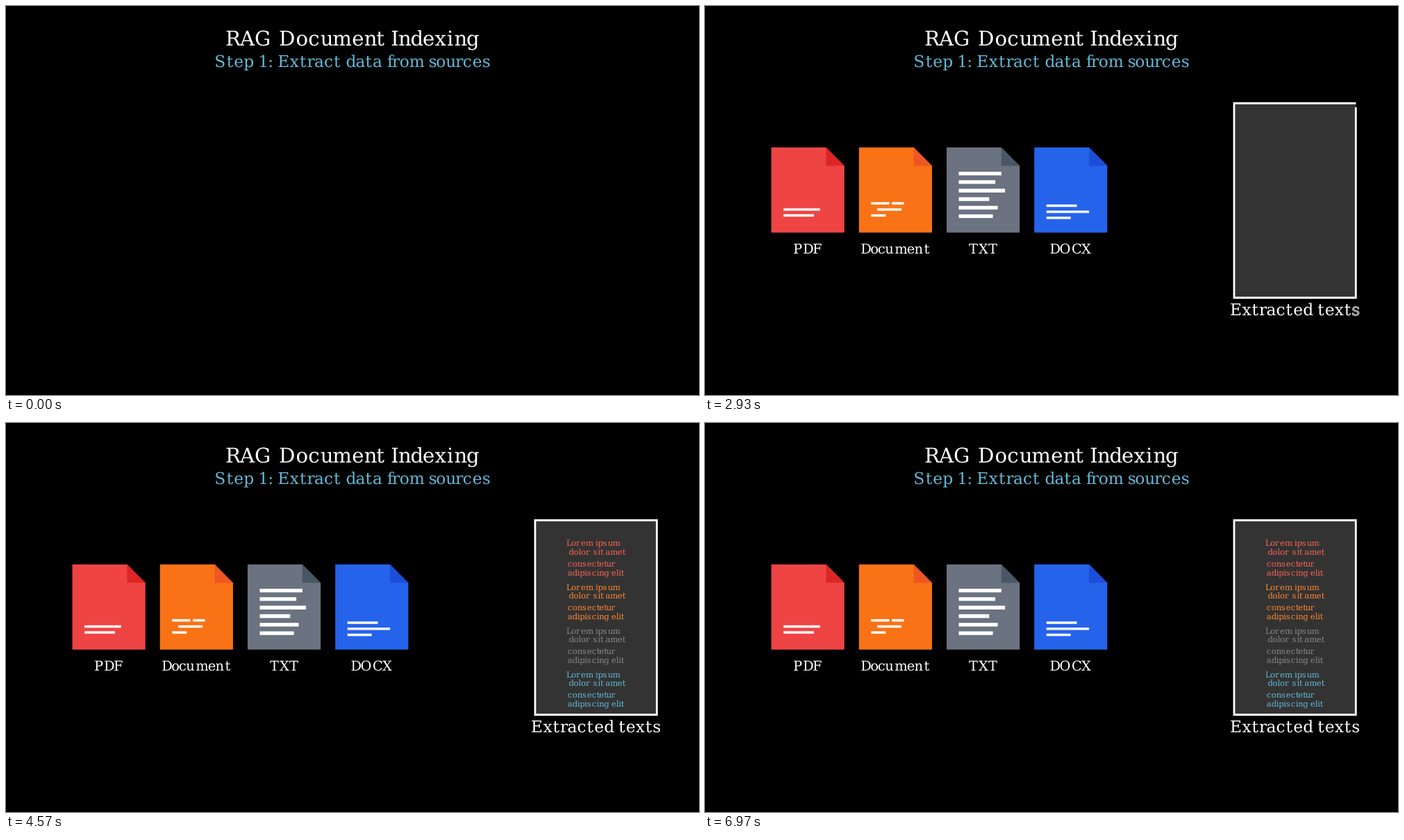
An HTML page with a canvas for the animation above (7.01 s loop, 998 by 561 pixels).

```html
<!DOCTYPE html>
<html lang="en">
<head>
<meta charset="utf-8">
<title>RAG Document Indexing</title>
<style>
html, body { margin: 0; width: 100%; height: 100%; overflow: hidden; background: #000; }
canvas { display: block; }
</style>
</head>
<body>
<canvas id="stage" width="998" height="561"></canvas>
<script>
const ctx = document.getElementById('stage').getContext('2d');
const LOOP = 7010, FPS = 30;
const U = 561 / 8;                       // pixels per scene unit
const GRID = U / 20;                     // letter advances snap to this
const PAGE_W = 1.5 * U, PAGE_H = 1.75 * U, FOLD = PAGE_W / 4;
const PAGE_X = 95.5, PAGE_Y = 204.1, STEP = 1.8 * U;
const MID = 499, BOX_X = MID + 5 * U;
const BLUE = '#62b9d6';

const clamp = v => Math.max(0, Math.min(1, v));
const lerp = (a, b, p) => a + (b - a) * p;

function smooth(t) {
  const sig = x => 1 / (1 + Math.exp(-x));
  const e = sig(-5);
  return clamp((sig(10 * (clamp(t) - 0.5)) - e) / (1 - 2 * e));
}

// Sets the font for a point size and returns its size in pixels.
function setFont(size) {
  const em = size / 3.6 * GRID;
  ctx.font = em + 'px "DejaVu Serif", serif';
  ctx.textRendering = 'geometricPrecision';
  return em;
}

// Lays out a string from pen position 0.
function layout(str, size) {
  setFont(size);
  let x = 0;
  return [...str].map(ch => {
    const letter = { ch, x };
    x += Math.round(ctx.measureText(ch).width / GRID) * GRID;
    return letter;
  });
}

// Lays out a string with its ink centred on cx.
function centred(str, size, cx) {
  const row = layout(str, size), last = row[row.length - 1];
  const left = -ctx.measureText(row[0].ch).actualBoundingBoxLeft;
  const right = last.x + ctx.measureText(last.ch).actualBoundingBoxRight;
  const shift = cx - (left + right) / 2;
  return row.map(l => ({ ch: l.ch, x: l.x + shift })).filter(l => l.ch !== ' ');
}

function drawRow(row, x, y, size, color) {
  setFont(size);
  ctx.fillStyle = color;
  row.forEach(l => ctx.fillText(l.ch, x + l.x, y));
}

// Traces the first part p of a closed polygon's outline.
function trace(pts, p) {
  const n = pts.length;
  const len = pts.map(([x, y], i) => {
    const q = pts[(i + 1) % n];
    return Math.hypot(q[0] - x, q[1] - y);
  });
  let left = len.reduce((a, b) => a + b) * p;
  ctx.beginPath();
  ctx.moveTo(...pts[0]);
  for (let i = 0; i < n && left > 0; i++) {
    const k = Math.min(1, left / len[i]), q = pts[(i + 1) % n];
    ctx.lineTo(lerp(pts[i][0], q[0], k), lerp(pts[i][1], q[1], k));
    left -= len[i];
  }
  if (p >= 1) ctx.closePath();
}

const rect = (x, y, w, h) => [[x + w, y], [x, y], [x, y + h], [x + w, y + h]];

function shape(pts, color) {
  return p => { trace(pts, p); ctx.fillStyle = color; ctx.fill(); };
}

function glyph(ch, x, y, size) {
  return p => {
    const em = setFont(size);
    ctx.fillStyle = '#fff';
    ctx.save();
    if (p < 1) {
      ctx.beginPath();
      ctx.rect(x, y - em, ctx.measureText(ch).width * p, em * 1.4);
      ctx.clip();
    }
    ctx.fillText(ch, x, y);
    ctx.restore();
  };
}

// Bars are [x offset, centre y, width].
const pages = [
  { label: 'PDF', page: '#ef4444', fold: '#dc2626', text: '#fc6255', bar: 3.5,
    bars: [[0, 293.4, 52.6], [0, 302.1, 43.8]] },
  { label: 'Document', page: '#f97316', fold: '#ee5624', text: '#ff862f', bar: 3.5,
    bars: [[0, 284.6, 26.3], [29.8, 284.6, 17.5], [8.8, 293.4, 35], [0, 302.1, 21]] },
  { label: 'TXT', page: '#6b7280', fold: '#495663', text: '#888888', bar: 5.3,
    bars: [61.4, 52.6, 66.6, 43.8, 56.1, 49.1].map((w, i) => [0, 241.7 + 12.27 * i, w]) },
  { label: 'DOCX', page: '#2563eb', fold: '#1d4ed8', text: BLUE, bar: 3.5,
    bars: [[0, 288.1, 43.8], [0, 296.8, 61.4], [0, 305.6, 35]] }
];

// All parts of the pages, in the order in which they get drawn.
const parts = pages.flatMap((f, i) => {
  const x = PAGE_X + i * STEP, r = x + PAGE_W, y = PAGE_Y, b = y + PAGE_H;
  f.cx = x + PAGE_W / 2;
  return [
    shape([[x, y], [r - FOLD, y], [r, y + FOLD], [r, b], [x, b]], f.page),
    shape([[r - FOLD, y], [r, y + FOLD], [r - FOLD, y + FOLD]], f.fold),
    ...f.bars.map(([dx, cy, w]) => shape(rect(x + U / 4 + dx, cy - f.bar / 2, w, f.bar), '#fff')),
    ...centred(f.label, 20, f.cx).map(l => glyph(l.ch, l.x, 357, 20))
  ];
});

const title = centred('RAG Document Indexing', 30, MID);
const subtitle = centred('Step 1: Extract data from sources', 24, MID);
const caption = centred('Extracted texts', 24, BOX_X);
const lorem = ['Lorem ipsum', ' dolor sit amet', 'consectetur', 'adipiscing elit']
  .map(s => layout(s, 12));

function drawPages(a) {
  parts.forEach((part, i) => {
    const p = smooth(a * parts.length - i);
    if (p > 0) part(p);
  });
}

function drawBox(a) {
  const p = smooth(a);
  if (p <= 0) return;
  trace(rect(BOX_X - 1.25 * U, 2 * U, 2.5 * U, 4 * U), p);
  ctx.fillStyle = '#333';
  ctx.fill();
  ctx.strokeStyle = '#fff';
  ctx.lineWidth = 2.8;
  ctx.stroke();
}

// Each letter gets its outline first, then its fill.
function drawCaption(a) {
  const lag = 0.2, total = (caption.length - 1) * lag + 1, y = 445.7;
  setFont(24);
  caption.forEach(({ ch, x }, i) => {
    const p = clamp(a * total - i * lag) * 2;
    if (p <= 0) return;
    ctx.save();
    ctx.strokeStyle = ctx.fillStyle = '#fff';
    if (p < 1) {
      ctx.lineWidth = 1.4;
      ctx.setLineDash([70 * p, 500]);
      ctx.strokeText(ch, x, y);
    } else {
      ctx.globalAlpha = p - 1;
      ctx.fillText(ch, x, y);
      ctx.globalAlpha = 1;
      if (p < 2) {
        ctx.lineWidth = 1.4 * (2 - p);
        ctx.strokeText(ch, x, y);
      }
    }
    ctx.restore();
  });
}

function drawExtracts(a) {
  const p = smooth(a);
  pages.forEach((f, i) => {
    const x = lerp(f.cx, BOX_X, p), drop = 0.9 * U * i;
    const y1 = lerp(258.8, 177.4 + drop, p);
    const y2 = lerp(298.5, 207 + drop, p);
    drawRow(lorem[0], x - 42.6, y1, 12, f.text);
    drawRow(lorem[1], x - 42.6, y1 + 12.5, 12, f.text);
    drawRow(lorem[2], x - 41, y2, 12, f.text);
    drawRow(lorem[3], x - 41, y2 + 12.5, 12, f.text);
  });
}

function draw(ms) {
  const t = Math.floor((ms % LOOP + 5) * FPS / 1000) / FPS;
  ctx.fillStyle = '#000';
  ctx.fillRect(0, 0, 998, 561);
  drawRow(title, 0, 57.3, 30, '#fff');
  drawRow(subtitle, 0, 88, 24, BLUE);
  drawPages(clamp(t - 1));
  drawBox(clamp(t - 2));
  drawCaption(clamp(t - 2));
  if (t >= 3) drawExtracts(clamp((t - 3) / 1.5));
}

function tick() {
  draw(performance.now());
  requestAnimationFrame(tick);
}
tick();
</script>
</body>
</html>
```
